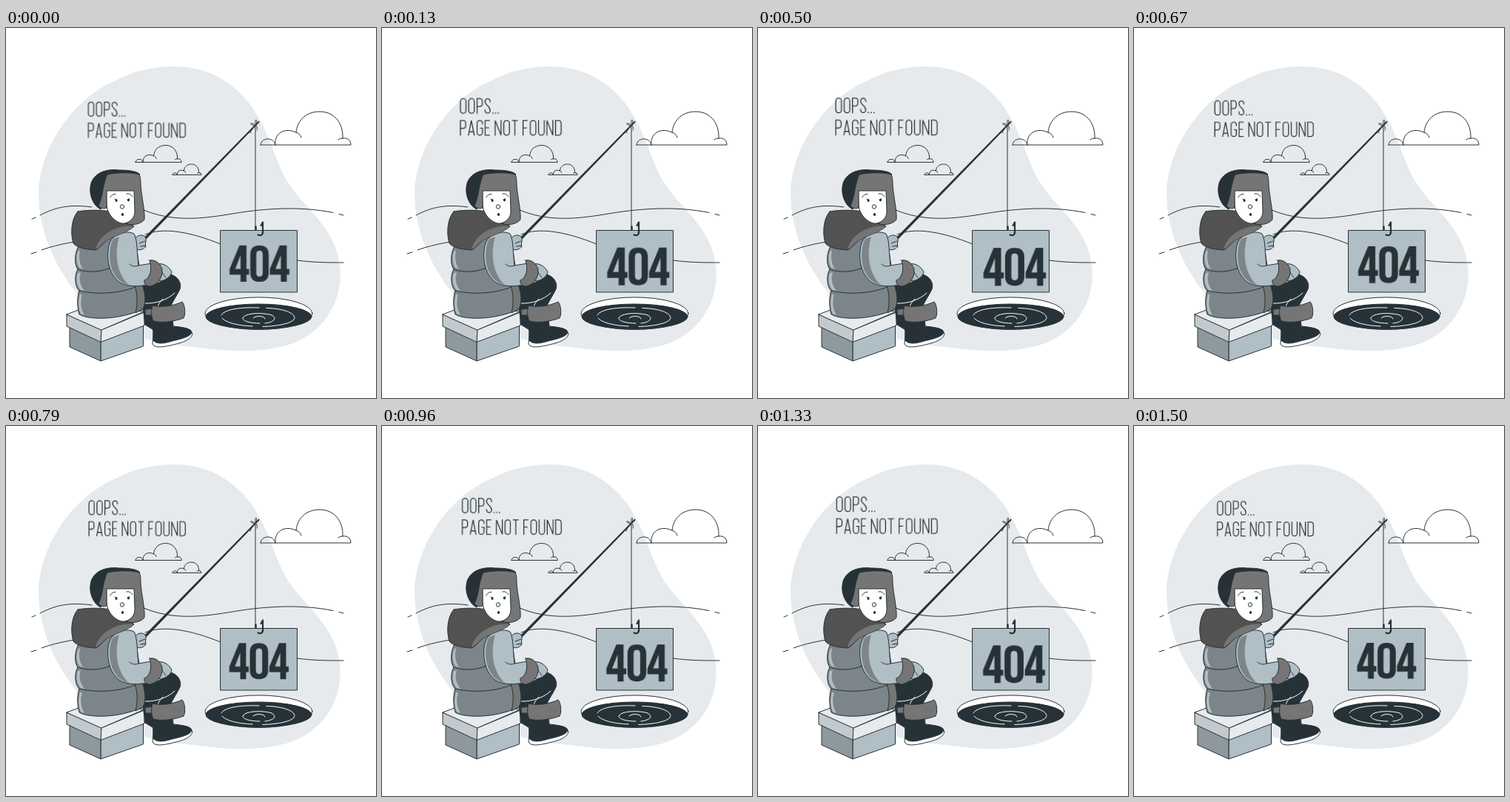
Animation, 500 px wide and 500 px high, one loop 1.54 s. Source, as an HTML page:

```html
<!DOCTYPE html>
<html lang="en">
<head>
<meta charset="utf-8">
<title>Page not found</title>
<style>
  html, body { margin: 0; width: 100%; height: 100%; overflow: hidden; background: #fff; }
  svg { display: block; width: 100%; height: 100%; }
  .ink { fill: none; stroke: #263238; stroke-linecap: round; stroke-linejoin: round; }
  #cloud path { vector-effect: non-scaling-stroke; }
  .white { fill: #fff; }
  .pale { fill: #e7ebee; }
  .shade { fill: #c3c9cd; }
  .steel { fill: #b0bec5; }
  .slate { fill: #8e999f; }
  .coat { fill: #7b858a; }
  .fur { fill: #757575; }
  .hood { fill: #525252; }
  .dark { fill: #263238; }
  .ripple { stroke: #fff; }
  #beat { transform-origin: 246.5px 221.5px; }
  #lines path { fill: none; stroke: #263238; stroke-width: 1.2; }
  #code { fill: #263238; fill-rule: evenodd; }
</style>
</head>
<body>
<svg viewBox="0 0 500 500" role="img" aria-label="Oops... Page not found. 404">
  <defs>
    <g id="cloud">
      <path d="M0 45C1 39 5 37 10 37C15 37 19 40 20 45"/>
      <path d="M0 45H122C122 39 118 35 111 36C112 15 99 0 80 0C63 0 50 10 48 28C33 21 18 29 20 45"/>
      <path d="M48 28C51 29 54 31 55 35M111 36C109 36 107 36.500 105 38"/>
    </g>
  </defs>

  <path fill="#e6eaed" d="M226 52C277 52 312 76 336 112C361 152 364 186 386 216C408 247 446 272 451 322C456 364 434 408 388 426C342 442 290 436 244 430C190 425 140 410 102 366C64 322 44 272 44 222C46 165 86 98 148 71C172 58 200 52 226 52Z"/>

  <g class="ink" stroke-width="1">
    <use href="#cloud" x="344" y="113"/>
    <use href="#cloud" transform="translate(175 158.500) scale(.51)"/>
    <use href="#cloud" transform="translate(225 184) scale(.32)"/>
    <path d="M35 258L40 256M46 253C62 245 80 237 116 242M186 246C225 262 262 258 300 252C345 244 395 240 442 249.500M450 251.500L456 253"/>
    <path d="M34 305L41 303M48 300C65 294 80 291 98 288M188 279C212 269 248 275 290 292M394 314C415 317 438 317 456 317"/>
  </g>

  <!-- ice hole -->
  <g class="ink" stroke-width="1">
    <ellipse class="white" cx="341.500" cy="385.700" rx="72.500" ry="21.800"/>
    <ellipse class="dark" cx="341.500" cy="390" rx="71.500" ry="17"/>
    <path class="ripple" d="M291 388C295 380 318 377 342 378M352 378.500C378 379 394 387 389 394C384 400 364 403 347 403.500M333 403C312 402 297 398 292 392"/>
    <path class="ripple" d="M320 392C322 385 346 384 359 388C368 393 360 398 350 399M343 399C330 399 319 396 320 392M334 392C338 388 350 389 350 393"/>
  </g>

  <!-- sign and hook -->
  <g class="ink" stroke-width="1">
    <rect class="steel" x="290" y="273.500" width="103.500" height="83.500"/>
    <path d="M337 133V270"/>
    <path stroke-width="2.500" stroke-linecap="butt" d="M337.500 267.500V273.500"/>
    <path stroke-width="2.200" d="M344.500 267L347 262.500V273C348 279 345 281.500 340.500 279.500"/>
  </g>

  <!-- stool -->
  <g class="ink" stroke-width="1">
    <path class="steel" d="M128 420V450L185.500 430V398Z"/>
    <path class="slate" d="M86 402V431L128 450V420Z"/>
    <path class="pale" d="M129 408L187 384V402L128 424.500Z"/>
    <path class="shade" d="M82 387V403L128 424.500L129 408Z"/>
    <path class="pale" d="M82 387L109 377L187 383L129 408Z"/>
  </g>

  <!-- legs -->
  <g class="ink" stroke-width="1">
    <path class="dark" d="M185 372L201 372V409L188 401Z"/>
    <path class="fur" d="M188 381C192 379 198 379 202 381V388L189 388Z"/>
    <path class="dark" d="M180 348C196 350 212 344 222 333C232 335 238 345 235 353C229 365 224 371 222 378L199 381C197 377 190 380 184 380Z"/>
    <path class="ripple" d="M187 372C204 373 220 366 228 358M212 366C208 370 206 373 205 377"/>
    <path class="white" d="M199 417L198 427C201 433 212 431 222 429C234 426 250 423 252 413L248 408Z"/>
    <path class="dark" d="M199 391L225 392L226 403C234 404 250 405 251 411C250 418 232 421 221 424C211 427 202 427 199 422Z"/>
    <path class="fur" d="M198 375C208 378 226 376 238 370C242 374 243 387 240 392C226 397 211 399 199 396C196 390 196 380 198 375Z"/>
  </g>

  <!-- rod -->
  <path class="dark" d="M182.500 287.500L185 290L342.800 127L341.500 125.600Z"/>
  <g class="ink" stroke-width="1">
    <path d="M336 131C330 126 328 130 335 132M337 130C335 122 341 122 338 131M337 131C333 135 331 139 330 142M337 131C340 134 340 136 339 138"/>
  </g>

  <!-- coat -->
  <g class="ink" stroke-width="1">
    <path class="coat" d="M100 292C92 302 92 320 97 326C92 334 93 350 99 355C95 367 97 380 99 387C110 394 150 396 185 380C190 372 188 354 183 344L174 280L130 280Z"/>
    <path class="fur" d="M174 348L183 345C188 354 190 371 185 380L175 385C178 373 178 360 174 348Z"/>
    <path d="M97 326C112 332 133 329 146 322M99 355C118 360 150 360 175 350"/>
    <path class="steel" stroke="none" d="M97 302C95 309 95 318 99 324L104 326C99 318 98 310 100 300ZM97 331C94 340 96 349 101 354L106 355.500C100 347 98 340 101 330ZM100 360C97 370 98 380 101 386L106 388C101 380 100 370 103 360Z"/>
    <path class="steel" d="M174 286C176 280 183 278 188 282C191 288 187 291 189 295C185 301 178 301 174 297Z"/>
    <path d="M188 288L180 291M189 294L182 295"/>
    <path class="steel" d="M204 319C212 317 221 322 224 330C223 335 217 341 208 342Z"/>
    <path d="M216 337C213 333 209 330 211 325"/>
    <path class="steel" d="M145 283C154 276 166 274 173 278C178 286 177 307 179 321L197 318L195 346C181 350 164 350 154 344C141 335 136 317 138 300C139 292 141 287 145 283Z"/>
    <path class="coat" stroke="none" d="M145 285C139 295 138 318 146 332C150 340 157 345 166 347C152 335 145 309 153 282Z"/>
    <path d="M179 321C174 323 170 322 167 319"/>
    <path class="fur" d="M194 314C203 312 211 320 211 329C211 339 204 347 195 349C189 349 186 345 187 341C195 338 198 325 194 314Z"/>
    <path class="hood" d="M97 248C112 245 136 246 145 249C154 253 166 261 173 268C165 276 148 280 138 286C130 291 126 299 121 300C109 299 97 298 91 291C87 278 88 258 97 248Z"/>
    <path class="fur" stroke="none" d="M172 268C160 266 145 271 134 279C127 285 122 293 121 299C127 297 130 290 138 286C148 280 165 276 172 268Z"/>
  </g>

  <!-- head -->
  <g class="ink" stroke-width="1">
    <path class="dark" d="M128 245C117 240 110 222 116 207C122 195 136 190 153 192C168 192 178 194 181 198L140 212Z"/>
    <path class="white" d="M136 218H175V250C173 259 165 265 156 264C145 261 137 250 136 240Z"/>
    <path class="fur" d="M137 198C150 195 171 195 180 198C182 202 182 207 182 212C183 228 188 246 187 259C181 266 169 267 162 264C171 260 174 255 174 247L173 220H136V243C131 245 127 243 125 240C131 229 131 208 137 198Z"/>
    <path d="M141 229C142 226 145 224 148 224.500M163 224C166 223 169 225 171 228"/>
    <path d="M147 231L150 233M164 232L167 231"/>
    <g class="dark" stroke="none">
      <ellipse cx="149" cy="233" rx="1.500" ry="2"/>
      <ellipse cx="165.500" cy="232.500" rx="1.500" ry="2"/>
      <ellipse cx="157.500" cy="252" rx="1.700" ry="1.900"/>
    </g>
    <ellipse cx="157" cy="241.500" rx="2.600" ry="2.800"/>
  </g>

  <g id="beat">
    <g id="lines"></g>
    <g id="code"></g>
  </g>
</svg>
<script>
  const NS = 'http://www.w3.org/2000/svg';
  const byId = id => document.getElementById(id);

  // Condensed lettering: [width, outline]
  const thin = {
    A: [7.6, 'M0 19.400L3.800 0L7.600 19.400M.9 14.400H6.700'],
    D: [7.2, 'M0 0H3.400Q7.200 0 7.200 3.800V15Q7.200 18.800 3.400 18.800H0Z'],
    E: [5.8, 'M6 0H0V18.800H6M0 9.300H5'],
    F: [5.8, 'M6 0H0V19.400M0 9.500H5'],
    G: [7, 'M7 5V3.500A3.500 3.500 0 0 0 0 3.500V15.300A3.500 3.500 0 0 0 7 15.300V9.800H3.800'],
    N: [7.6, 'M0 19.400V0L7.600 18.800V-.6'],
    O: [7.2, 'M0 3.600A3.600 3.600 0 0 1 7.200 3.600V15.200A3.600 3.600 0 0 1 0 15.200Z'],
    P: [6.8, 'M0 19.400V0H3.400Q6.800 0 6.800 3.600V6.500Q6.800 10.100 3.400 10.100H0'],
    S: [6.6, 'M6.600 4.800V3.500A3.300 3.300 0 0 0 0 3.500Q0 6.400 3.300 9.200T6.600 15.300A3.300 3.300 0 0 1 0 15.300V14'],
    T: [7, 'M-.4 0H7.400M3.500 0V19.400'],
    U: [7.2, 'M0 -.6V15.200A3.600 3.600 0 0 0 7.200 15.200V-.6'],
    '.': [0, 'M0 17.600V19.400'],
    ' ': [0, '']
  };
  const bold = {
    4: [26, 'M13 0H22.500V31.500H26V39H22.500V48.500H14.600V39H0V31.500ZM14.600 31.500V13L7.500 31.500Z'],
    0: [24.6, 'M0 12Q0 0 12.300 0T24.600 12V36.500Q24.600 48.500 12.300 48.500T0 36.500Z' +
              'M8 12V36.500Q8 41.500 12.300 41.500T16.600 36.500V12Q16.600 7 12.300 7T8 12Z']
  };

  function letter(parent, font, text, x, y, gap) {
    for (const ch of text) {
      const [width, d] = font[ch];
      const path = document.createElementNS(NS, 'path');
      path.setAttribute('d', d);
      path.setAttribute('transform', `translate(${x} ${y})`);
      parent.append(path);
      x += width + gap;
    }
  }
  letter(byId('lines'), thin, 'OOPS...', 112.8, 101.6, 3.5);
  letter(byId('lines'), thin, 'PAGE NOT FOUND', 112.8, 129.8, 3.5);
  letter(byId('code'), bold, '404', 301.5, 293, 1.6);

  // Two beats, [ms, scale], shown at 24 pictures a second
  const LOOP = 1540, COUNT = 37;
  const beats = [[0, 1.0117], [265, 1.1], [820, 1], [865, 1], [1165, 1.1], [1485, 1], [LOOP, 1]];

  function scaleAt(t) {
    const i = beats.findIndex(([end]) => t < end);
    const [t0, a] = beats[i - 1], [t1, b] = beats[i];
    return a + (b - a) * (t - t0) / (t1 - t0);
  }

  const frames = Array.from({ length: COUNT }, (_, k) => {
    const t = Math.round(k * LOOP / COUNT / 10) * 10;
    return { offset: t / LOOP, transform: `scale(${scaleAt(t)})`, easing: 'steps(1, end)' };
  });
  frames.push({ offset: 1, transform: 'scale(1)' });
  byId('beat').animate(frames, { duration: LOOP, iterations: Infinity });
</script>
</body>
</html>
```
